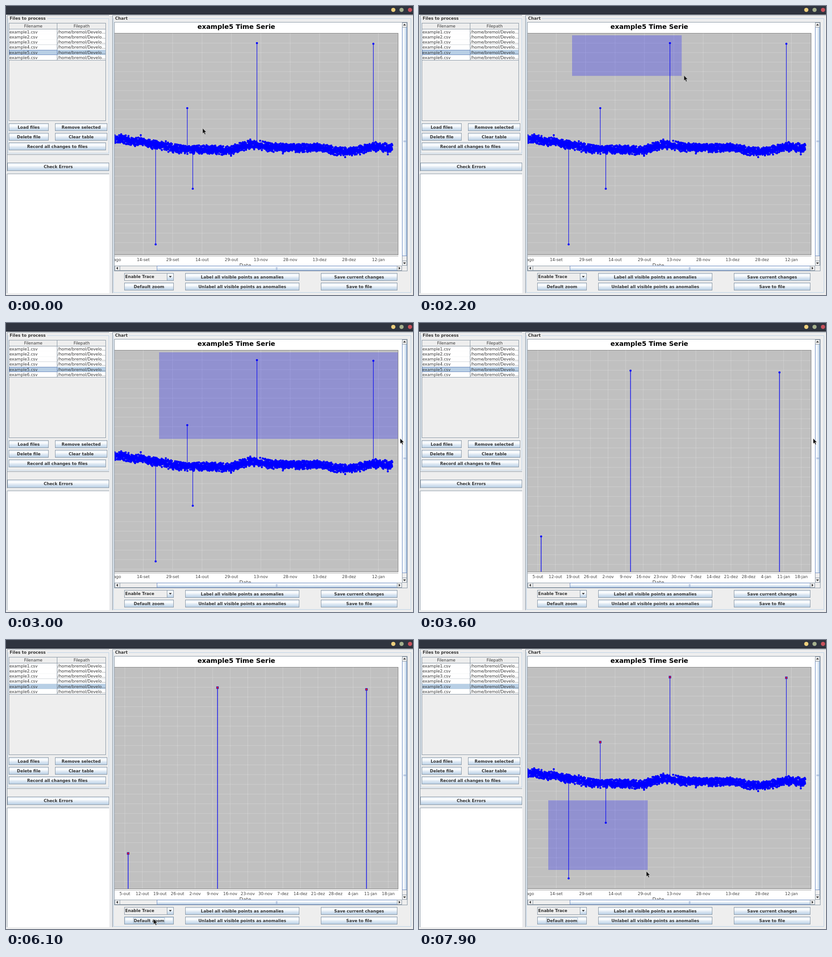
An HTML page that plays this animation: 888x631 px, repeating every 8 s.

```html
<!DOCTYPE html>
<html lang="en">
<head>
<meta charset="utf-8">
<title>Time series labelling</title>
<style>
html, body { margin: 0; width: 100%; height: 100%; overflow: hidden; background: #eee; }
svg { display: block; }
text { font: 8.9px "DejaVu Sans", sans-serif; fill: #333; }
.b { font-weight: bold; }
.m { text-anchor: middle; }
.title { font-size: 14.35px; fill: #000; }
.tick { fill: #404040; }
.line { fill: none; stroke: #8795a3; }
.soft { fill: none; stroke: #b8cfe5; }
.blue { fill: none; stroke: #6f8cc0; }
.grid { stroke: #fff; stroke-width: .8; stroke-dasharray: 1.5 1.5; opacity: .6; }
</style>
</head>
<body>
<svg id="stage" width="888" height="631" viewBox="0 0 888 631"></svg>
<script>
const LOOP = 8000, STEP = 100;
const stage = document.getElementById('stage');
const range = n => [...Array(n).keys()];

const text = (x, y, str, cls = '') => `<text x="${x}" y="${y}" class="${cls}">${str}</text>`;
const rect = (x1, y1, x2, y2, attrs) =>
  `<rect x="${x1}" y="${y1}" width="${x2 - x1}" height="${y2 - y1}" ${attrs}/>`;
const frame = (x1, y1, x2, y2, cls = 'line', fill = 'none') =>
  rect(x1 + .5, y1 + .5, x2 - .5, y2 - .5, `class="${cls}" style="fill:${fill}"`);
const tri = (x, y, turn) =>
  `<path d="M-3.2 -1.6H3.2L0 1.9Z" fill="#333" transform="translate(${x} ${y}) rotate(${turn})"/>`;

function button(x1, y1, x2, y2, label, id = '', focusHalf = 0) {
  const cx = (x1 + x2) / 2, cy = (y1 + y2) / 2;
  const states = id && `
    <g id="${id}Hover">${frame(x1 + 1, y1 + 1, x2 - 1, y2 - 1, 'soft')}</g>
    <g id="${id}Press">${frame(x1, y1, x2, y2, 'line', '#b8cfe5')}</g>
    <g id="${id}Focus">${rect(cx - focusHalf, cy - 6, cx + focusHalf, cy + 6, 'fill="none" stroke="#a3b8cc"')}</g>`;
  return frame(x1, y1, x2, y2, 'line', 'url(#down)') + states + text(cx, cy + 3.2, label, 'b m');
}

const gradient = (id, x2, y2) => `
  <linearGradient id="${id}" x2="${x2}" y2="${y2}">
    <stop offset="0" stop-color="#dde8f3"/><stop offset=".3" stop-color="#fff"/>
    <stop offset=".6" stop-color="#dde8f3"/><stop offset="1" stop-color="#b8cfe5"/>
  </linearGradient>`;

const defs = `<defs>${gradient('down', 0, 1)}${gradient('across', 1, 0)}
  <pattern id="bumps" width="3" height="3" patternUnits="userSpaceOnUse">
    <path d="M0 .5h1M1.5 2h1" stroke="#c3ccd6"/><path d="M1 1h1M2 2.5h1" stroke="#fff" stroke-width=".7"/>
  </pattern>
  <clipPath id="view"><rect x="237" y="36" width="627" height="530.5"/></clipPath>
  <clipPath id="plot"><rect x="237" y="60" width="619" height="483.5"/></clipPath>
</defs>`;

function titleBar() {
  const dots = [[845, '#edcf7d'], [863, '#a5b08d'], [881.5, '#c8525d']];
  return rect(0, 0, 888, 19, 'fill="#2f343f"') +
    dots.map(([x, c]) => `<circle cx="${x}" cy="8.5" r="4.6" fill="${c}"/>`).join('');
}

function filePanel() {
  const top = i => 50.5 + i * 11.3;
  const rows = range(6).map(i =>
    rect(7, top(i), 217, top(i + 1), `fill="${i === 4 ? '#b8cfe5' : '#fff'}"`) +
    `<path class="line" d="M7 ${Math.round(top(i + 1)) + .5}H217"/>` +
    text(7.5, top(i) + 9, `example${i + 1}.csv`) +
    text(112.7, top(i) + 9, '/home/bremol/Develo...')).join('');
  return '<path class="line" d="M225 20.5H2.5V324.5H225"/>' + frame(4, 27, 225, 322, 'soft') +
    rect(6, 22, 90, 32, 'fill="#eee"') + text(8, 30, 'Files to process', 'b') +
    frame(6, 37, 218, 251) + rows +
    '<path class="line" d="M7 50.5H217M111.5 38V118.5"/>' +
    text(59.5, 47.3, 'Filename', 'm') + text(165, 47.3, 'Filepath', 'm') +
    `<g id="rowFocus">${frame(7, 96, 112, 107, 'blue')}</g>` +
    button(6, 256, 93, 273, 'Load files') + button(107, 256, 221, 273, 'Remove selected') +
    button(6, 277, 93, 294, 'Delete file') + button(107, 277, 221, 294, 'Clear table') +
    button(6, 298, 218, 315, 'Record all changes to files') +
    '<path class="line" d="M2.5 324V361"/>' + button(3, 342, 225, 360, 'Check Errors') +
    rect(2, 361, 225, 366, 'fill="url(#bumps)"') + rect(3, 367, 225, 627, 'fill="#fff"') +
    '<path class="line" d="M225 366.5H2.5V627"/>' +
    rect(226, 20, 232, 627, 'fill="url(#bumps)"');
}

function scrollBars() {
  return frame(864, 36, 875, 567) + frame(237, 567, 864, 578) +
    frame(864, 46, 875, 546, 'blue', 'url(#across)') +
    frame(329, 567, 854, 578, 'blue', 'url(#down)') +
    '<path class="line" d="M864 46.5H875M864 556.5H875M248.5 567V578M853.5 567V578"/>' +
    '<path class="blue" d="M867 294.5h6M867 296.5h6M589.5 570v6M591.5 570v6" opacity=".7"/>' +
    tri(869.5, 41, 180) + tri(869.5, 561.5, 0) + tri(242.5, 572.5, 90) + tri(858.5, 572.5, -90);
}

function chartPanel() {
  return '<path class="line" d="M888 20.5H232.5V627"/>' + frame(234, 27, 884, 626, 'soft') +
    rect(236, 22, 268, 32, 'fill="#eee"') + text(238, 30, 'Chart', 'b') +
    frame(236, 35, 876, 579) + rect(237, 36, 864, 567, 'fill="#fff"') +
    `<g clip-path="url(#view)">
      ${text(502.5, 49.5, 'example5 Time Serie', 'b m title')}
      ${rect(230, 59.5, 855.5, 543.5, 'fill="#c0c0c0" stroke="#808080"')}
      <path d="M237 546.5H856" stroke="#b0b0b0"/>
      <text x="522" y="570" class="m tick" style="font-size:10.8px">Date</text>
      <g id="fullView">${fullView()}</g><g id="zoomView">${zoomView()}</g>
      <rect id="selection" fill="rgba(0,0,255,.247)"/>
    </g>` + scrollBars() +
    frame(258, 583, 366, 600) + frame(351, 583, 366, 600, 'line', 'url(#down)') + tri(358.5, 591, 0) +
    text(260, 594, 'Enable Trace', 'b') +
    button(258, 604, 366, 621, 'Default zoom', 'reset', 34) +
    button(391, 583, 640, 600, 'Label all visible points as anomalies', 'label', 91) +
    button(391, 604, 640, 621, 'Unlabel all visible points as anomalies') +
    button(687, 583, 854, 600, 'Save current changes') +
    button(687, 604, 854, 621, 'Save to file');
}

function axes(x0, dx, labels, y0, dy) {
  const lines = range(24).map(i => y0 + i * dy).filter(y => y < 543)
    .map(y => `<path class="grid" d="M237 ${y.toFixed(1)}H855"/>`);
  const ticks = labels.split(' ').map((s, i) => {
    const x = +(x0 + i * dx).toFixed(1);
    return (x > 237 ? `<path class="grid" d="M${x} 60V543"/>` : '') + text(x, 557, s, 'm tick');
  });
  return lines.concat(ticks).join('');
}

// Trend of the series as x, y knots.
const trend = [[236, 292], [250, 290], [270, 294], [300, 297], [326, 304], [345, 305], [363, 311],
  [400, 313], [440, 313], [480, 316], [495, 314], [515, 306], [545, 302], [575, 308], [620, 310],
  [680, 309], [710, 314], [742, 318], [770, 314], [800, 307], [844, 311]];
const outliers = [[294, 282], [326, 294], [491, 327], [533, 291.5], [604, 322], [740, 330], [833, 324]];
const lows = [[326.5, 520.5], [407.5, 399]];
const highs = [[395.5, 223], [547.5, 81], [801.5, 82.5]];

function trendAt(x) {
  const i = Math.max(1, trend.findIndex(p => p[0] >= x));
  const [[x1, y1], [x2, y2]] = [trend[i - 1], trend[i]];
  return y1 + (y2 - y1) * (x - x1) / (x2 - x1);
}

function seeded(seed) {
  return () => (seed = (seed * 16807) % 2147483647) / 2147483647;
}

const dots = pts => `<path d="${pts.map(([x, y]) => `M${x.toFixed(1)} ${y.toFixed(1)}h0`).join('')}"
  stroke="#00f" stroke-width="4.6" stroke-linecap="round"/>`;
const stems = (pts, foot, w) => pts.map(([x, y]) =>
  `<path d="M${x} ${y}V${foot(x)}" stroke="#11e" stroke-width="${w}"/>`).join('');
const marks = pts => `<g class="marks">${pts.map(([x, y]) =>
  rect(x - 2.2, y - 2.2, x + 2.2, y + 2.2, 'fill="#f00018" stroke="#2020d0"')).join('')}</g>`;

function fullView() {
  const rnd = seeded(77);
  const cloud = range(2500).map(i => {
    const x = 237 + i * 606 / 2500;
    return [x, trendAt(x) + (rnd() + rnd() - 1) * 11];
  });
  return axes(235.4, 64.12, '30-ago 14-set 29-set 14-out 29-out 13-nov 28-nov 13-dez 28-dez 12-jan', 81, 20.75) +
    `<g clip-path="url(#plot)">${stems([...lows, ...highs, ...outliers], trendAt, 1.2)}
    ${dots([...cloud, ...outliers, ...lows, ...highs])}</g>` + marks(highs);
}

function zoomView() {
  const pts = highs.map(([x, y]) => [Math.round(x * 1.2796 - 239.6) + .5, y * 2.549 - 102.4]);
  return axes(259.3, 38.31, '5-out 12-out 19-out 26-out 2-nov 9-nov 16-nov 23-nov 30-nov 7-dez ' +
    '14-dez 21-dez 28-dez 4-jan 11-jan 18-jan', 82, 21.2) +
    stems(pts, () => 543, 1.5) + dots(pts) + marks(pts);
}

const pointer = `<path id="pointer" d="M0 0V11.5L2.6 9.2L4.6 13.6L6.6 12.7L4.6 8.5H8.2Z"
  fill="#111" stroke="#ddd" stroke-width=".6"/>`;

stage.innerHTML = defs + rect(0, 0, 888, 631, 'fill="#eee"') +
  titleBar() + filePanel() + chartPanel() + pointer;

// Pointer path: time, x, y.
const path = [[0, 429, 267], [400, 429, 267], [900, 332, 55], [1100, 332, 55], [1400, 332.5, 62],
  [1500, 332.5, 62], [1600, 333, 63], [1800, 333, 63], [2500, 762, 218], [2700, 812, 226],
  [3000, 860, 252], [3600, 860, 252], [4100, 572, 587], [5300, 572, 587], [5301, 320, 623],
  [5800, 320, 623], [6000, 322, 609], [6300, 322, 609], [6900, 272, 391], [7100, 281, 349],
  [7900, 496, 505], [LOOP, 496, 505]];
const drags = [
  { from: 1900, to: 3600, x: 334, y: 64, dx: -5, dy: 1 },
  { from: 7200, to: LOOP, x: 282, y: 350, dx: 3, dy: -3 },
];

function pointerAt(t) {
  const i = Math.max(1, path.findIndex(k => k[0] >= t));
  const [t1, x1, y1] = path[i - 1], [t2, x2, y2] = path[i];
  const p = (t - t1) / (t2 - t1);
  return [x1 + (x2 - x1) * p, y1 + (y2 - y1) * p];
}

const el = Object.fromEntries([...stage.querySelectorAll('[id]')].map(e => [e.id, e]));
const markGroups = stage.querySelectorAll('.marks');
const show = (node, on) => node.setAttribute('visibility', on ? 'visible' : 'hidden');

function render(time) {
  const t = Math.floor((time % LOOP) / STEP) * STEP;
  const within = (a, b) => t >= a && t < b;
  const [x, y] = pointerAt(t);

  el.pointer.setAttribute('transform', `translate(${x.toFixed(1)} ${y.toFixed(1)})`);
  show(el.pointer, !within(5300, 5700));

  const drag = drags.find(d => within(d.from, d.to));
  show(el.selection, drag);
  if (drag) {
    const box = {
      x: drag.x, y: drag.y,
      width: Math.max(0, x + drag.dx - drag.x), height: Math.max(0, y + drag.dy - drag.y),
    };
    for (const k in box) el.selection.setAttribute(k, box[k]);
  }

  const zoomed = within(3600, 6300);
  el.fullView.style.display = zoomed ? 'none' : '';
  el.zoomView.style.display = zoomed ? '' : 'none';
  markGroups.forEach(g => show(g, t >= 4600));

  show(el.rowFocus, t < 4500);
  show(el.labelHover, within(4100, 5300));
  show(el.labelPress, within(4500, 4600));
  show(el.labelFocus, within(4500, 6000));
  show(el.resetHover, within(5900, 6400));
  show(el.resetPress, within(6000, 6100));
  show(el.resetFocus, t >= 6000);
}

const start = performance.now();
function tick() {
  render(performance.now() - start);
  requestAnimationFrame(tick);
}
tick();
</script>
</body>
</html>
```
